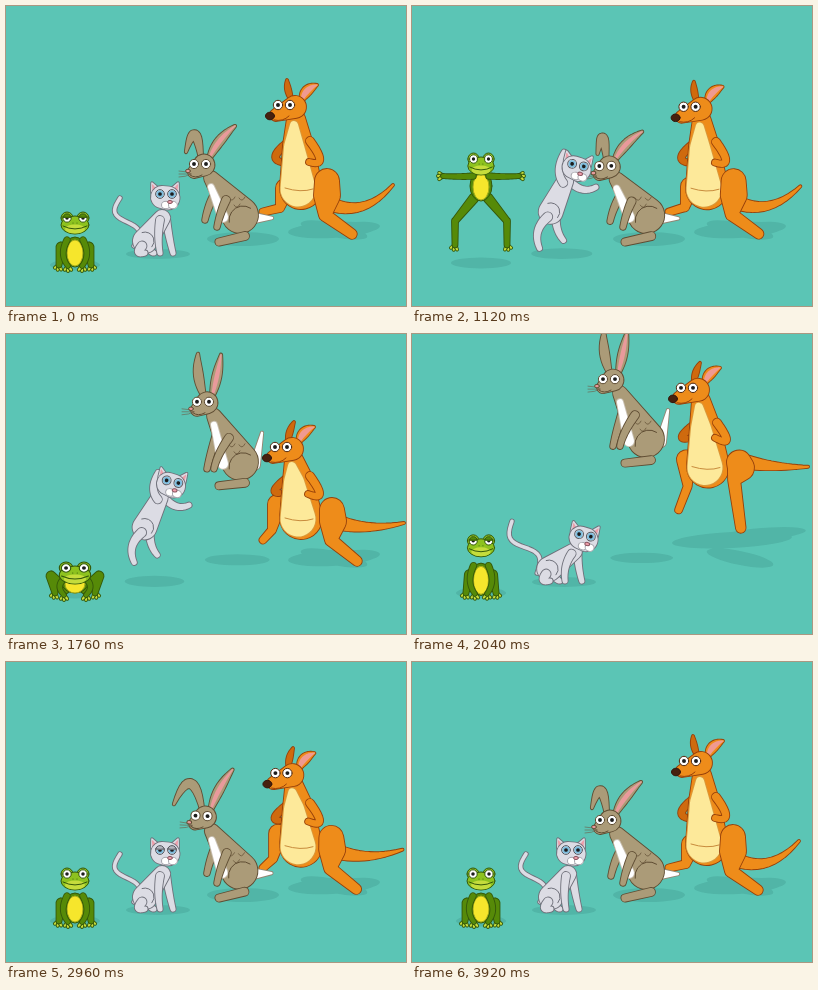
Animation of 400x300 px, one loop 4240 ms. Source, as an HTML page with a canvas:

```html
<!DOCTYPE html>
<html lang="en">
<head>
<meta charset="utf-8">
<title>Jumping animals</title>
<style>
html, body { margin: 0; width: 100%; height: 100%; overflow: hidden; background: #5bc5b5; }
canvas { display: block; width: 400px; height: 300px; }
</style>
</head>
<body>
<canvas id="stage" width="400" height="300"></canvas>
<script>
const LOOP = 4240, STEP = 40, LAST = 98;
const ctx = document.getElementById('stage').getContext('2d');
ctx.lineCap = ctx.lineJoin = 'round';

// Motion
const clamp = (v, lo, hi) => Math.max(lo, Math.min(hi, v));
const lerp = (a, b, k) => a + (b - a) * k;
const ramp = (t, a, b) => clamp((t - a) / (b - a), 0, 1);
const ease = (t, a, b) => { const u = ramp(t, a, b); return u * u * (3 - 2 * u); };
const blink = (t, mid, half) => ease(t, mid - half, mid - half / 2) - ease(t, mid + half / 2, mid + half);

// One jump: squat, take off, fly, land in a squat, rise a little too far, settle
function hop(t, ready, go, land, high) {
  const off = ease(t, go - 80, go + 100), down = ease(t, land - 160, land + 60);
  const rebound = .4 * Math.sin(Math.PI * ramp(t, land + 300, land + 800));
  const u = ramp(t, go, land), up = 4 * high * u * (1 - u);
  return {
    up, air: off - down, rise: ease(up / high, .5, .95),
    squat: ease(t, ready, ready + 360) - off + down - ease(t, land + 140, land + 400) - rebound
  };
}

// A joint at rest, with its shifts when squatting, flying and at full height
const joints = h => (x, y, sx = 0, sy = 0, ax = 0, ay = 0, rx = 0, ry = 0) =>
  [x + sx * h.squat + ax * h.air + rx * h.rise, y + sy * h.squat + ay * h.air + ry * h.rise];
const add = (p, x, y) => [p[0] + x, p[1] + y];
const ball = (p, r) => [p[0], p[1], r];
const plant = (p, ground) => [p[0], Math.min(p[1], ground)];

// Drawing
function at([x, y], rot, draw, sx = 1, sy = 1) {
  ctx.save();
  ctx.translate(x, y);
  ctx.rotate(rot);
  ctx.scale(sx, sy);
  draw();
  ctx.restore();
}

const both = draw => [-1, 1].forEach(s => at([0, 0], 0, () => draw(s), s));

function blob([x, y], rx, ry, fill, line) {
  ctx.beginPath();
  ctx.ellipse(x, y, rx, ry, 0, 0, 7);
  if (fill) { ctx.fillStyle = fill; ctx.fill(); }
  if (line) { ctx.strokeStyle = line; ctx.lineWidth = 1; ctx.stroke(); }
}

// Skin stretched over a row of balls, outlined as one shape
function chain(fill, line, ...balls) {
  ctx.beginPath();
  for (let i = 1; i < balls.length; i++) {
    const [x, y, r] = balls[i - 1], [u, v, s] = balls[i];
    const dir = Math.atan2(v - y, u - x);
    const open = Math.acos(clamp((r - s) / (Math.hypot(u - x, v - y) || 1), -1, 1));
    ctx.moveTo(x + r * Math.cos(dir + open), y + r * Math.sin(dir + open));
    ctx.arc(x, y, r, dir + open, dir - open + 2 * Math.PI);
    ctx.arc(u, v, s, dir - open, dir + open);
    ctx.closePath();
  }
  if (line) { ctx.strokeStyle = line; ctx.lineWidth = 1.8; ctx.stroke(); }
  ctx.fillStyle = fill;
  ctx.fill();
}

// Balls along a curve pulled towards c
function bow(a, c, b, r0, r1, bulge = 0) {
  return Array.from({ length: 13 }, (_, i) => {
    const k = i / 12, q = n => lerp(lerp(a[n], c[n], k), lerp(c[n], b[n], k), k);
    return [q(0), q(1), lerp(r0, r1, k) + bulge * Math.sin(Math.PI * k)];
  });
}

// Balls along an S between a and b
function wave(a, b, amp, r) {
  const d = Math.hypot(b[0] - a[0], b[1] - a[1]) || 1;
  return Array.from({ length: 21 }, (_, i) => {
    const k = i / 20, s = amp * Math.sin(2 * Math.PI * k) / d;
    return [lerp(a[0], b[0], k) + s * (b[1] - a[1]), lerp(a[1], b[1], k) - s * (b[0] - a[0]), r];
  });
}

function bend(a, c, b, color, w = 1) {
  ctx.beginPath();
  ctx.moveTo(...a);
  ctx.quadraticCurveTo(...c, ...b);
  ctx.strokeStyle = color;
  ctx.lineWidth = w;
  ctx.stroke();
}

function crease([x, y], r, from, to, color) {
  ctx.beginPath();
  ctx.arc(x, y, r, from, to);
  ctx.strokeStyle = color;
  ctx.lineWidth = 1;
  ctx.stroke();
}

function eye(x, y, r, lid, skin, line, iris) {
  const c = [x, y];
  blob(c, r, r, '#fff');
  if (iris) blob(c, r * .85, r * .85, iris);
  blob(c, r * .42, r * .42, '#1c1c1c');
  if (lid > .02) {
    ctx.save();
    ctx.beginPath();
    ctx.arc(x, y, r, 0, 7);
    ctx.clip();
    ctx.fillStyle = skin;
    ctx.fillRect(x - r, y - r, 2 * r, 2 * r * lid);
    ctx.restore();
    const ly = y - r + 1.5 * r * lid;
    bend([x - r, ly], [x, ly + 1], [x + r, ly], line);
  }
  blob(c, r, r, null, line);
}

function shadow(...ovals) {
  ctx.beginPath();
  for (const [x, y, rx, ry, rot = 0] of ovals) {
    ctx.moveTo(x, y);
    ctx.ellipse(x, y, rx, ry, rot, 0, 7);
  }
  ctx.fillStyle = 'rgba(20,70,75,.13)';
  ctx.fill();
}

// Animals
function frog(t) {
  const h = hop(t, 200, 920, 1640, 76), p = joints(h), { up, air, squat } = h;
  const line = '#34580a', dark = '#568a08', skin = '#8dc21f', pale = '#c5dc3c';
  const lid = blink(t, 120, 160) + blink(t, 2160, 160);
  shadow([69, 259 - up / 30, 25 + up / 12, 5.5]);

  const toes = (from, dir) => {
    for (let i = -1; i < 2; i++) {
      const a = dir + i * .7;
      chain(pale, line, ball(from, 1.5), ball(add(from, 5 * Math.cos(a), 5 * Math.sin(a)), 1));
    }
  };
  at([69, -up], 0, () => {
    both(() => {
      const foot = plant(p(16, 259, 4, 0, 10, 41), 259 + up);
      toes(foot, 1.3);
      chain(dark, line, ball(p(8, 254, 2, 1, -1, -1), 4.5), ball(p(14, 241, 10, 1, 12, 35), 4.5 - air * 1.5), ball(foot, 2.5));
    });
    const belly = p(0, 246, 0, 3, 0, -5);
    blob(belly, 11 + 2 * squat, 15 - 5 * squat, dark, line);
    blob(add(belly, 0, 1), 8 + 2 * squat, 13 - 4 * squat, '#f6e62c', '#a9ad1c');
    both(() => {
      const hand = p(7, 260, 4, 1, 31, -29);
      toes(hand, (1 - air) * 1.57);
      chain(dark, line, ...bow(p(8, 234, 2, 10, 0, -3), p(16, 249, 4, 3, 8, -17), hand, 2.8, 2));
    });
    at(p(0, 217, 0, 22, 0, 2), 0, () => {
      both(() => blob([8, -5], 6, 6, skin, line));
      blob([0, 2], 14, 9, skin, line);
      blob([0, 6], 10, 4.5, pale);
      both(() => {
        eye(8, -5, 4.2, lid, dark, line);
        blob([2, 0], .5, .5, line);
      });
      bend([-12, 3], [0, 9], [12, 3], line);
    }, 1 + .12 * squat - .06 * air);
  });
}

function cat(t) {
  const h = hop(t, 160, 1060, 1860, 80), p = joints(h), { up, air, squat } = h;
  const line = '#6f707a', skin = '#dcdce4', pink = '#ee9eaa';
  const lid = blink(t, 3080, 160), ground = 247 + up;
  shadow([152 - up / 10, 248 - up / 60, 32 - up / 16, 5 + up / 60]);

  at([0, -up], 0, () => {
    const chest = p(156, 212, 6, 6, -4, -18), hip = p(139, 235, -2, 0, 0, -8);
    const leg = (from, mid, to, r) => chain(skin, line, ...bow(from, mid, plant(to, ground), r, 2.6));
    chain(skin, line, ...wave(p(128, 240, -3, -1, 18, -8), p(114, 192, -15, -5, 38, 42), lerp(-9, -2, air), 1.8));
    leg(add(hip, 5, 5), p(144, 246, 0, 0, 0, 2), p(148, 247, 0, 0, 4, 11), 4);
    leg(add(chest, 4, 0), p(163, 232, 3, 0, 8, -24), p(167, 247, 3, 0, 19, -50), 4);
    chain(skin, line, ball(chest, 8), ball(hip, 12));
    crease(hip, 9, -1.9, .7, line);
    leg(add(hip, -3, 5), p(128, 249, -1, 0, -9, -3), p(139, 247, -1, 0, -13, 20), 4.5);
    leg(add(chest, -2, 2), p(151, 232, 0, 0, -10, -52), p(154, 247, -1, 0, -2, -90), 4);
    at(p(159, 192, 13, 14, 4, -10), .22 * (squat + air), () => {
      both(() => {
        chain(skin, line, [9, -6, 5], [13, -15, .8]);
        chain(pink, null, [10, -7, 2.5], [12.5, -13, .6]);
      });
      chain(skin, line, [-3, -1, 11], [3, 0, 11.5]);
      for (const x of [-5, 7]) eye(x, -4, 4.4, lid, '#b4b6be', '#55565e', '#80bfe0');
      for (const x of [1, 8]) blob([x, 7], 4.5, 3.7, '#fff', '#a5a5ac');
      blob([5, 4], 2.4, 1.6, pink, '#8b5560');
    });
  });
}

function rabbit(t) {
  const h = hop(t, 1040, 1600, 2280, 117), p = joints(h), { up, squat } = h;
  const line = '#5f4d33', skin = '#ab9b78', pink = '#e99a9b', k = up / 117;
  const lid = ease(squat, .4, .8);
  shadow([237 - 8 * k, 233 - 10 * k, 36 - 5 * k, 7 - 2 * k]);

  at([0, -up], 0, () => {
    const neck = p(205, 172, -3, 11, 3, -6), hip = p(234, 209, 2, 1, 0, 3), head = p(196, 161, -5, 15, 3, -6);
    const arm = (from, to) => chain(skin, line, ...bow(from, add(to, 3, -14), to, 4, 2.8));
    chain('#fff', '#928673', ball(add(hip, 15, 3), 5), ball(p(266, 212, 2, 3, -10, -29), 1.2));
    arm(add(neck, 3, 18), p(199, 214, -7, 10, 2, 5));
    const ear = (x, mid, tip) => bow(add(head, x, -8), mid, tip, 2, 1.2, 3);
    chain(skin, line, ...ear(-1, p(190, 108, 12, 38, 0, 18), p(180, 146, 44, 14, 12, -42)));
    const ear2 = ear(7, p(211, 134, 0, 26, 0, -6), p(229, 120, 9, 45, -14, -15));
    chain(skin, line, ...ear2);
    chain(pink, null, ...ear2.map(([x, y, r]) => [x, y, r * .5]));
    chain(skin, line, ball(neck, 7), ball(hip, 18));
    chain('#fff', '#c9c0b2', ball(add(neck, 0, 9), 3), ball(add(hip, -17, 2), 5));
    for (let i = 0; i < 3; i++) {
      const c = add(hip, 5 * i - 8, 7 * (i % 2) - 17);
      bend(add(c, -3, 0), add(c, 0, 5), add(c, 3, -1), '#766447');
    }
    arm(add(neck, 15, 22), p(211, 221, 0, 0, -3, -2));
    crease(add(hip, 3, 5), 14, -3.3, -1, line);
    chain(skin, line, ball(add(hip, 5, 21), 4), ball(p(213, 236), 3.6));
    at(head, -.15 * squat, () => {
      chain(skin, line, [2, -2, 10.5], [-8, 5, 6]);
      for (const x of [-8, 4]) eye(x, -3, 4.6, lid, '#75634c', line);
      blob([-14, 4], 2.4, 1.8, pink, line);
      bend([-12, 8], [-7, 12], [0, 8], line);
      for (let y = 4; y < 12; y += 3) bend([-11, 7], [-16, y], [-23, y], '#6d5b45', .6);
    });
  });
}

function kangaroo(t) {
  const h = hop(t, 1040, 1960, 2760, 116), p = joints(h), { up, squat, air } = h;
  const line = '#96400a', skin = '#ee8c1a', deep = '#cf6a0e', far = ramp(up, 0, 40);
  shadow([326 - 6 * far, 224 - 18 * far, 44 + 16 * far, 8, -.05], [328, 224, 34, 7, .2], [350, 222 - 22 * far, 24 + 20 * far, 6, -.08]);

  at([0, -up], 0, () => {
    const neck = p(290, 113, -2, 13, -1, -5), chest = p(292, 140, 0, 7, 1, -5), hip = p(295, 182, 0, 2, 1, -8);
    chain(skin, line, ...bow(p(322, 197, 12, -8, 12, -28), p(357, 213, 5, -16, 5, -38, -20, -5),
      p(387, 179, 11, 10, 9, -5, -49, -52), 7, 1));
    chain(skin, line, ball(p(279, 182, -8, -12, -5, -15), 9), ball(p(274, 202, -8, -6, 2, -8), 4),
      ball(plant(p(257, 206, 0, 0, 10, 12, 15, 14), 206 + up), 3.5));
    chain(deep, line, ...bow(add(chest, -9, -4), add(chest, -31, 12), p(275, 156, -2, 3, 0, -10, -8, -26), 4, 3));
    chain(skin, line, ball(neck, 9), ball(chest, 15), ball(hip, 21));
    chain('#fde99a', '#d9993c', ball(add(neck, -2, 6), 4), ball(add(chest, -4, 1), 10), ball(add(hip, -3, 1), 17.5));
    bend(add(hip, -16, 0), add(hip, 0, 5), add(hip, 12, 1), '#c88b3c');
    chain(skin, line, ...bow(add(chest, 12, -5), add(chest, 32, 22), p(303, 156, -1, 4, 0, -11, -18, -20), 4, 3));
    chain(skin, line, ball(p(321, 175, 5, 1, 6, -5), 12), ball(p(321, 189, 6, -2, 8, -14), 13),
      ball(p(319, 209, 6, -3, 3, -22), 6), ball(plant(p(346, 228, 5, -1, -18, 8, -19, 16), 230 + up), 4.8));
    at(p(285, 103, -3, 14, -3, -4), 0, () => {
      const lean = 10 * (squat + air);
      chain(deep, line, ...bow([0, -10], [-4 + lean / 2, -20], [-4 + lean, -29], 2, 1, 1.5));
      const ear = bow([11, -9], [14, -20], [26, -24], 2, 1, 3.5);
      chain(skin, line, ...ear);
      chain('#f09a90', null, ...ear.map(([x, y, r]) => [x, y, r * .6]));
      chain(skin, line, [4, -2, 11], [-15, 6, 6]);
      for (const x of [-13, -1]) eye(x, -4, 4.7, 0, skin, '#53290d');
      blob([-21, 7], 4.5, 3.8, '#47210e', '#32150a');
      bend([-17, 11], [-8, 13], [-2, 7], line);
    });
  });
}

function render(now) {
  const t = Math.min(LAST, Math.floor(now % LOOP / STEP)) * STEP;
  ctx.fillStyle = '#5bc5b5';
  ctx.fillRect(0, 0, 400, 300);
  for (const animal of [kangaroo, rabbit, cat, frog]) animal(t);
}

const start = performance.now();
function tick() {
  render(performance.now() - start);
  requestAnimationFrame(tick);
}
tick();
</script>
</body>
</html>
```
